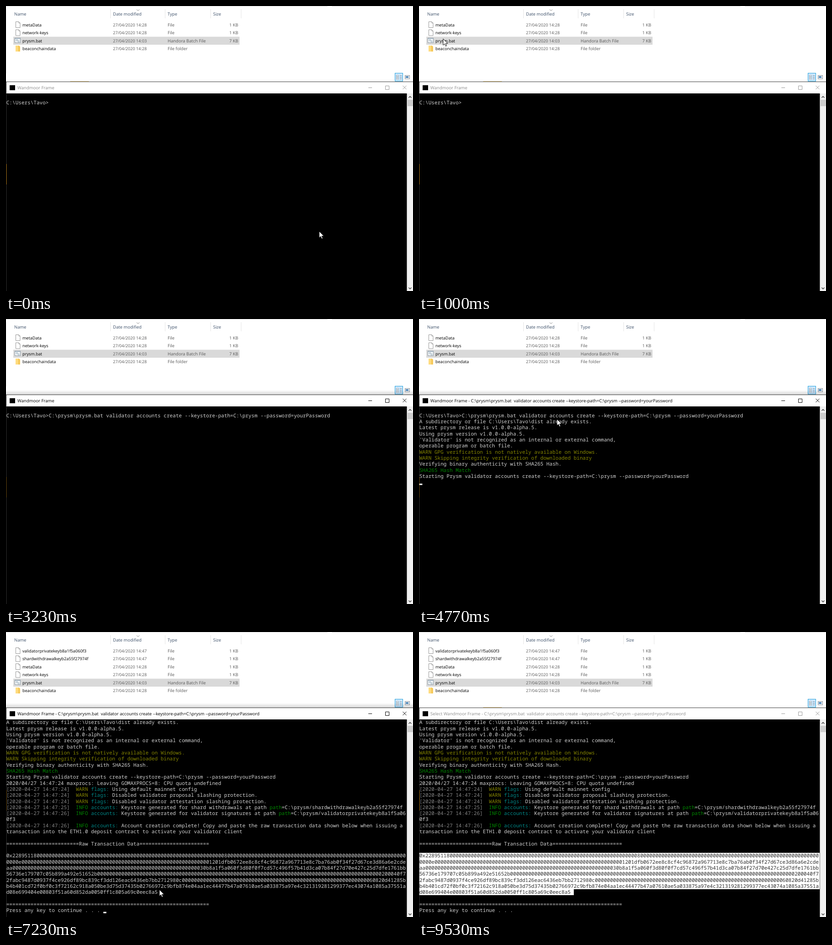
Write an HTML page that moves like this. It is 894 px wide and 626 px high and loops after 9660 ms.

```html
<!DOCTYPE html>
<html lang="en">
<head>
<meta charset="utf-8">
<title>Validator account setup</title>
<style>
html, body { margin: 0; width: 100%; height: 100%; overflow: hidden; background: #fff; }
svg { display: block; width: 894px; height: 626px; }
text { white-space: pre; text-rendering: geometricPrecision; }
.ui { font-family: "Open Sans", "Noto Sans", sans-serif; }
.mono { font: 11.098px "Noto Sans Mono", "DejaVu Sans Mono", monospace; }
</style>
</head>
<body>
<svg id="stage" viewBox="0 0 894 626">
  <defs>
    <linearGradient id="fade" x2="0" y2="1">
      <stop offset="0" stop-opacity="0"/>
      <stop offset="1" stop-opacity="0.16"/>
    </linearGradient>
  </defs>
</svg>
<script>
const LOOP = 9660;
const CELL_W = 6.659, CELL_H = 2 * CELL_W, LEFT = 0.7, TOP = 191.8, COLS = 132;
const stage = document.getElementById("stage");

function add(parent, tag, attrs = {}, content) {
  const el = document.createElementNS("http://www.w3.org/2000/svg", tag);
  for (const k in attrs) el.setAttribute(k, attrs[k]);
  if (content !== undefined) el.textContent = content;
  parent.append(el);
  return el;
}
const rect = (p, x, y, width, height, fill, more) =>
  add(p, "rect", { x, y, width, height, fill, ...more });
const path = (p, d, stroke, more) =>
  add(p, "path", { d, stroke, fill: "none", ...more });
const label = (p, x, y, size, fill, s, more) =>
  add(p, "text", { x, y, fill, class: "ui", "font-size": size, ...more }, s);
const show = (el, on) => el.setAttribute("display", on ? "inline" : "none");

// ---- file list ----
const HEAD = "#3d5069", DETAIL = "#595959";
rect(stage, 0, 0, 894, 626, "#fff");
rect(stage, 0, 0, 706, 1, "#d9d9d9");
rect(stage, 716, 0, 178, 1, "#d9d9d9");
rect(stage, 0, 7, 1, 141, "#ececec");
for (const x of [229, 349, 449, 516]) rect(stage, x, 7, 1, 20, "#e5e5e5");
path(stage, "M287 7.5l3 3 3-3", "#777", { "stroke-width": 0.9 });
[[18, "Name"], [235, "Date modified"], [355, "Type"], [455, "Size"]]
  .forEach(([x, s]) => label(stage, x, 20.5, 9.5, HEAD, s));

const icons = {
  file(g) {
    path(g, "M21.5 -6.5h6.5l3 3v10h-9.5z", "#8c8c8c", { fill: "#fff", "stroke-width": 0.9 });
    path(g, "M28 -6.5v3h3", "#8c8c8c", { "stroke-width": 0.8 });
  },
  batch(g) {
    rect(g, 19.5, -5.5, 12, 10, "#f7f9fa", { stroke: "#8796a2", "stroke-width": 0.9 });
    rect(g, 20, -5, 11, 1.6, "#b8c8d4");
    add(g, "circle", { cx: 24, cy: -0.7, r: 1.7, fill: "none", stroke: "#8ba4b5" });
    add(g, "circle", { cx: 27.8, cy: 1.6, r: 1.5, fill: "none", stroke: "#8ba4b5" });
  },
  folder(g) {
    path(g, "M21 -6.5h7.5l2.5 2v11h-10z", "none", { fill: "#f6c95c" });
    path(g, "M21 -6.5h5.5v13h-5.5z", "none", { fill: "#ffdc80" });
  }
};

function fileRow(parent, i, icon, name, time, type, size) {
  const g = add(parent, "g", { transform: `translate(0 ${41 + 17.5 * i})` });
  if (icon === "batch") g.bar = rect(g, 16, -8.5, 497, 17.5, "#d9d9d9");
  icons[icon](g);
  label(g, 36, 3.6, 9.2, "#000", name);
  label(g, 235, 3.6, 9.15, DETAIL, "27/04/2020 " + time);
  label(g, 355, 3.6, 9.5, DETAIL, type);
  label(g, 510, 3.6, 9.3, DETAIL, size, { "text-anchor": "end" });
  return g;
}
const oldFiles = add(stage, "g"), newFiles = add(stage, "g");
fileRow(oldFiles, 0, "file", "metaData", "14:28", "File", "1 KB");
fileRow(oldFiles, 1, "file", "network-keys", "14:28", "File", "1 KB");
const batchBar = fileRow(oldFiles, 2, "batch", "prysm.bat", "14:03", "Handora Batch File", "7 KB").bar;
fileRow(oldFiles, 3, "folder", "beaconchaindata", "14:28", "File folder", "");
fileRow(newFiles, 0, "file", "validatorprivatekeyb8a1f5a060f3", "14:47", "File", "1 KB");
fileRow(newFiles, 1, "file", "shardwithdrawalkeyb2a55f27974f", "14:47", "File", "1 KB");

// view buttons
rect(stage, 854.5, 147.5, 17, 17.5, "#cce8ff", { stroke: "#26a0da" });
for (let i = 0; i < 3; i++) {
  rect(stage, 857.5, 152 + i * 3.5, 5, 2, "#fff", { stroke: "#7d8790", "stroke-width": 0.6 });
  rect(stage, 865, 152.5 + i * 3.5, 4.5, 1, "#7d8790");
}
rect(stage, 876.5, 152.5, 10, 7.5, "#eef5fb", { stroke: "#8a8f94" });
path(stage, "M878 154.5h6v3h-6z", "none", { fill: "#2f6ea8" });

// ---- console ----
const PROMPT = "C:\\Users\\Tavo>";
const ARGS = " validator accounts create --keystore-path=C:\\prysm --password=yourPassword";
const CALL = "C:\\prysm\\prysm.bat";
const stamp = (sec, level, tag, s) =>
  `~d[2020-04-27 14:47:${sec}]  ${level} ~c${tag}: ~w${s}`;
const warn = s => stamp(24, "~yWARN", "flags", s);
const info = (sec, s) => stamp(sec, "~gINFO", "accounts", s);
const zeros = (head, gap, tail) => head + "0".repeat(gap) + tail;

// [time, text], one entry per row
const lines = [
  [0, ""],
  [0, PROMPT],
  [3770, "A subdirectory or file C:\\Users\\Tavo\\dist already exists."],
  [4300, "Latest prysm release is v1.0.0-alpha.5."],
  [4300, "Using prysm version v1.0.0-alpha.5."],
  [4300, "'Validator' is not recognized as an internal or external command,"],
  [4300, "operable program or batch file."],
  [4300, "~yWARN GPG verification is not natively available on Windows."],
  [4300, "~yWARN Skipping integrity verification of downloaded binary"],
  [4300, "Verifying binary authenticity with SHA265 Hash."],
  [4500, "~gSHA265 Hash Match"],
  [4500, "Starting Prysm" + ARGS],
  [4900, "2020/04/27 14:47:24 maxprocs: Leaving GOMAXPROCS=8: CPU quota undefined"],
  [4900, warn("Using default mainnet config")],
  [4900, warn("Disabled validator proposal slashing protection.")],
  [4900, warn("Disabled validator attestation slashing protection.")],
  [5500, info(25, "Keystore generated for shard withdrawals at path ~gpath~w=C:\\prysm/shardwithdrawalkeyb2a55f27974f")],
  [6400, info(26, "Keystore generated for validator signatures at path ~gpath~w=C:\\prysm/validatorprivatekeyb8a1f5a06")],
  [6400, "0f3"],
  ...[
    info(26, "Account creation complete! Copy and paste the raw transaction data shown below when issuing a"),
    "transaction into the ETH1.0 deposit contract to activate your validator client",
    "",
    "=".repeat(24) + "Raw Transaction Data" + "=".repeat(23),
    "",
    zeros(zeros("0x22895118", 62, "8"), 59, ""),
    zeros("0000e", 62, "1201dfb0672ee8c8cf4c96872a967713e8c7ba76ab0f34f27d67ce3d86a6e2cde"),
    zeros("aa", 62, "30b8a1f5a060f3d80f0f7cd57c496f57b41d3ca07b84f27d70e427c25d7dfe1761bb"),
    zeros("56736e179707c05b899a492e51652b", 94, "200040f7"),
    zeros("2fabc9487d0937f4ce926df89bc839cf3dd126eac6436eb7bb2712980c", 62, "60820d41285b"),
    "b4b401cd72f0bf0c3f72162c918a050be3d75d37435b02766972c9bfb874e04aa1ec44477b47a07610ae5a033875a97e4c321319281299377ec43074a1085a37551a",
    "d08e699404e00803f51a60d852da0050ff1c805a69c0eec8a5",
    "",
    "=".repeat(67),
    "Press any key to continue . . ."
  ].map(s => [6440, s])
];
const COLORS = { w: "#d2d2d2", d: "#868686", y: "#868600", g: "#008600", c: "#008686" };

rect(stage, 0, 166, 894, 460, "#000");
const screen = add(stage, "g");
const rows = lines.map(([, s], i) => {
  const t = add(screen, "text", { class: "mono", x: LEFT, y: TOP + i * CELL_H + 10.6, fill: COLORS.w });
  s.split("~").forEach((part, k) => {
    if (k) add(t, "tspan", { fill: COLORS[part[0]] }, part.slice(1));
    else if (part) add(t, "tspan", {}, part);
  });
  return t;
});
const caret = rect(screen, 0, 0, CELL_W, 3, "#fff");

// selection inverts what lies below it
const FIRST = 24, LAST = 30, END_COL = 51;
const marks = [];
for (let r = FIRST; r <= LAST; r++)
  marks.push(rect(screen, 0, TOP + r * CELL_H, 0, CELL_H, "#fff",
    { style: "mix-blend-mode:difference", "shape-rendering": "crispEdges" }));

// title bar and frame
const shadow = rect(stage, 0, 156, 894, 10, "url(#fade)");
rect(stage, 0, 166, 894, 26, "#fff");
rect(stage, 0, 166, 894, 1, "#3c3c3c");
rect(stage, 0, 166, 1, 460, "#333");
const tab = rect(stage, 141, 165, 41, 1, "#ecd08a");
const edge = rect(stage, 0, 347, 1, 45, "#b8801c");
rect(stage, 8, 174, 12, 11, "#000");
const title = label(stage, 25, 183, 9.6, "#000", "");
const buttons = path(stage, "M796 179.5h8M833.5 175.5h8v8h-8zM871.5 175l8 8M879.5 175l-8 8", "#000");

// scrollbar
rect(stage, 880.5, 192, 13.5, 434, "#f0f0f0");
rect(stage, 882, 206, 12, 14, "#cdcdcd");
path(stage, "M884.5 201.5l3-3 3 3M884.5 618.5l3 3 3-3", "#404040", { "stroke-width": 1.5 });

const pointer = path(stage, "M0 0V14.2L3.3 11.1 5.6 16.4 7.8 15.4 5.6 10.3H10.1Z", "#000",
  { fill: "#fff", "stroke-width": 0.9 });

// ---- motion ----
// visible stretches of pointer travel: [time, x, y]
const trips = [
  { until: 2200, keys: [[0, 688, 495], [30, 688, 495], [630, 88, 32], [1000, 53, 72],
    [1230, 53, 72], [1730, 262, 247], [1830, 276, 270], [2030, 276, 270], [2200, 290, 250]] },
  { from: 4770, until: 8370, keys: [[4770, 303, 220], [5730, 301, 448], [6030, 262, 520],
    [6730, 262, 520], [7230, 337, 566], [7400, 337, 566], [7930, 30, 512], [8330, 8, 495]] },
  { from: 8930, until: 9240, keys: [[8930, 8, 509], [9240, 205, 630]] }
];
const ease = u => u * u * (3 - 2 * u);

function pointerAt(t) {
  const trip = trips.find(p => t >= (p.from || 0) && t < p.until);
  if (!trip) return null;
  const k = trip.keys;
  const i = k.findIndex(p => p[0] > t);
  if (i < 0) return k[k.length - 1].slice(1);
  const [a, b] = [k[i - 1], k[i]];
  const u = ease((t - a[0]) / (b[0] - a[0]));
  return [a[1] + (b[1] - a[1]) * u, a[2] + (b[2] - a[2]) * u];
}

function commandAt(t) {
  if (t < 1700) return PROMPT;
  return PROMPT + CALL + (t < 3030 ? "" : ARGS);
}

function titleAt(t) {
  const name = "Wandmoor Frame";
  if (t < 3770) return name;
  return (t < 7400 ? "" : "Select ") + `${name} - ${CALL} ${ARGS}`;
}

function caretAt(t) {
  const inside = (a, b) => t >= a && t < b;
  if (inside(2200, 2630) || inside(2700, 3030)) return [1, 33];
  if (inside(3030, 3230)) return [1, 107];
  if (inside(3770, 4300)) return [3, 0];
  if (inside(4300, 4500)) return [10, 0];
  if (inside(4500, 4900)) return [12, 0];
  if (inside(4900, 5500)) return [16, 0];
  if (inside(5500, 6400)) return [17, 0];
  if (inside(6400, 6440)) return [19, 0];
  if (inside(6440, 7400) || inside(8530, 8930)) return [33, 32];
  return null;
}

function drawSelection(t, pos, scroll) {
  let row = FIRST, col = 0;
  if (pos && t < 8330) {
    row = Math.floor((pos[1] + 0.5 - TOP + scroll) / CELL_H);
    col = Math.floor((pos[0] - LEFT) / CELL_W);
  }
  marks.forEach((m, i) => {
    const r = FIRST + i;
    const from = r === row ? col : 0;
    const to = r === LAST ? END_COL : COLS;
    const cells = t < 7400 || r < row ? 0 : Math.max(0, to - from);
    m.setAttribute("x", LEFT + from * CELL_W);
    m.setAttribute("width", cells * CELL_W);
  });
}

function draw(t) {
  const active = t >= 2030 && t < 9530;
  const pos = pointerAt(t);
  const scroll = t < 6440 ? 0 : 2 * CELL_H;

  const grown = t >= 6730;
  oldFiles.setAttribute("transform", `translate(0 ${grown ? 35 : 0})`);
  show(newFiles, grown);
  batchBar.setAttribute("fill", t >= 1230 && t < 1700 ? "#cce8ff" : "#d9d9d9");

  rows.forEach((row, i) => show(row, t >= lines[i][0]));
  const cmd = commandAt(t);
  if (rows[1].textContent !== cmd) rows[1].textContent = cmd;
  screen.setAttribute("transform", `translate(0 ${-scroll})`);

  const c = caretAt(t);
  show(caret, c);
  if (c) {
    caret.setAttribute("x", LEFT + c[1] * CELL_W);
    caret.setAttribute("y", TOP + c[0] * CELL_H + 10);
  }
  drawSelection(t, pos, scroll);

  const name = titleAt(t);
  if (title.textContent !== name) title.textContent = name;
  title.setAttribute("fill", active ? "#000" : "#8c8c8c");
  buttons.setAttribute("stroke", active ? "#000" : "#999");
  edge.setAttribute("fill", active ? "#6e4d11" : "#b8801c");
  show(shadow, active);
  show(tab, !active);

  show(pointer, pos);
  if (pos) pointer.setAttribute("transform", `translate(${pos[0].toFixed(1)} ${pos[1].toFixed(1)})`);
}

const start = performance.now();
function tick() {
  draw((performance.now() - start) % LOOP);
  requestAnimationFrame(tick);
}
tick();
</script>
</body>
</html>
```
